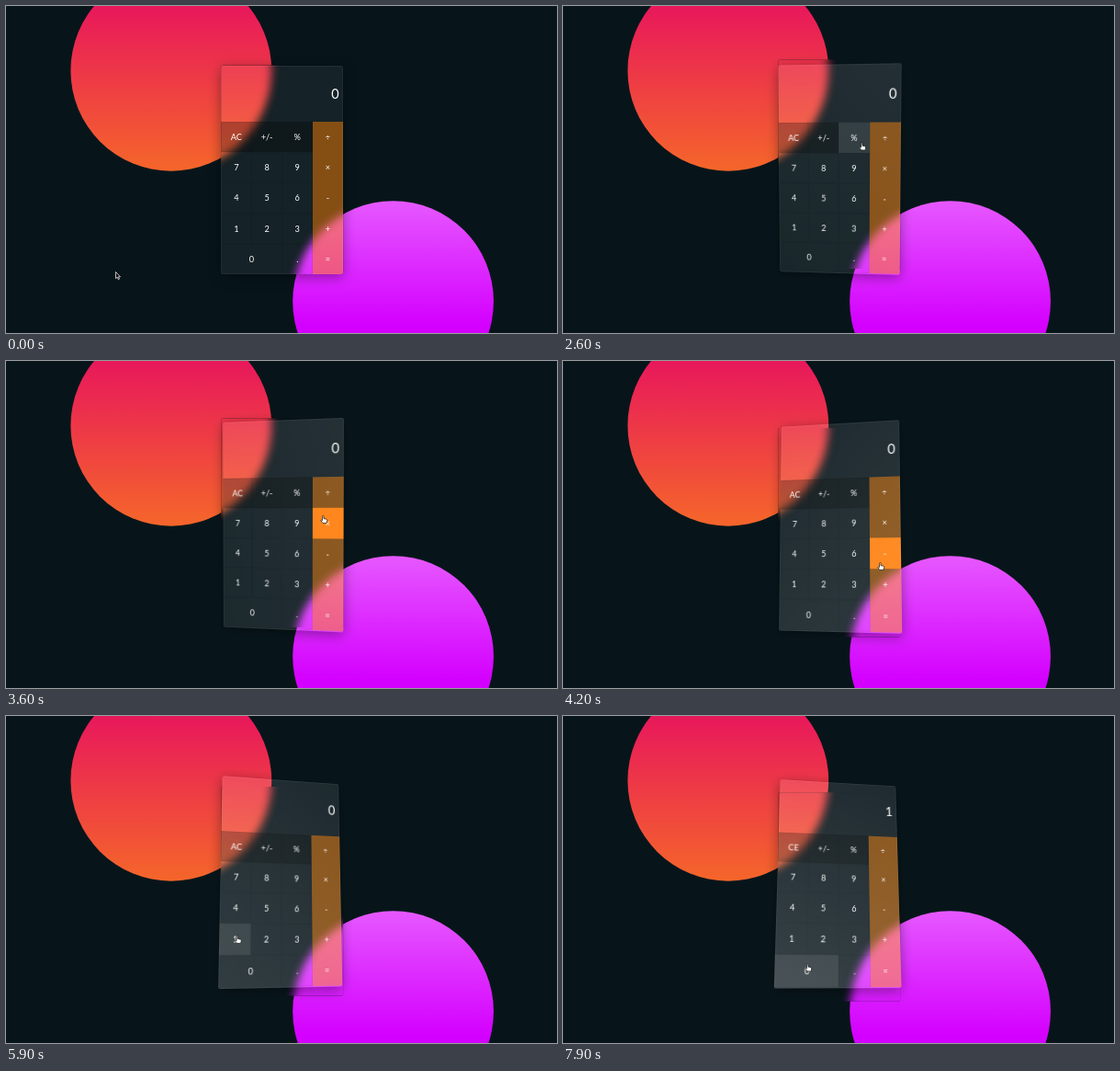
An HTML page that plays this animation: 600 by 356 pixels, repeating every 8 s.

```html
<!DOCTYPE html>
<html lang="en">
<head>
<meta charset="utf-8">
<title>Glass calculator</title>
<style>
  html, body { margin: 0; width: 100%; height: 100%; overflow: hidden; background: #07151a; }
  #stage { position: relative; width: 600px; height: 356px; overflow: hidden; }
  svg { position: absolute; left: 0; top: 0; }
  #calc {
    position: absolute; left: 234.3px; top: 64.5px; width: 132.8px; height: 227.5px;
    border-radius: 2.5px; background: rgba(255, 255, 255, .053);
    box-shadow: 0 3px 14px rgba(0, 0, 0, .38);
    color: #fff; font-family: Lato, "Open Sans", sans-serif;
  }
  #clip { position: absolute; inset: 0; overflow: hidden; border-radius: 2.5px; }
  #screen {
    position: absolute; right: 4.5px; top: 20.5px; height: 22px; line-height: 22px;
    font-size: 14.5px;
  }
  .key {
    position: absolute; box-sizing: border-box; height: 33.2px; line-height: 33px;
    text-align: center; font-size: 9.2px; box-shadow: inset 0 0 0 .5px rgba(0, 0, 0, .13);
  }
  .top { background: rgba(0, 0, 0, .28); }
  .op { background: rgba(255, 128, 0, .48); box-shadow: none; }
  .key.hover { background: rgba(255, 255, 255, .09); }
  .op.hover { background: #ff8010; }
  #glare {
    position: absolute; left: 50%; top: 50%; width: 456px; height: 456px; margin: -228px;
    background: linear-gradient(to top, rgba(255, 255, 255, 0), #fff);
  }
  #rim {
    position: absolute; inset: 0; border-radius: 2.5px;
    box-shadow: inset 0 0 0 .7px rgba(255, 255, 255, .08);
  }
</style>
</head>
<body>
<div id="stage">
  <svg width="600" height="356" viewBox="0 0 600 356">
    <defs>
      <linearGradient id="warm" x1="0" y1="0" x2="0" y2="1">
        <stop offset="0" stop-color="#e4095f"/>
        <stop offset=".18" stop-color="#e8185b"/>
        <stop offset="1" stop-color="#f5662a"/>
      </linearGradient>
      <linearGradient id="violet" x1="0" y1="0" x2="0" y2="1">
        <stop offset="0" stop-color="#e658ff"/>
        <stop offset=".62" stop-color="#d400ff"/>
        <stop offset="1" stop-color="#d000ff"/>
      </linearGradient>
      <filter id="blur" filterUnits="userSpaceOnUse" x="-60" y="-60" width="720" height="560"
              color-interpolation-filters="sRGB">
        <feGaussianBlur stdDeviation="5"/>
      </filter>
      <clipPath id="pane">
        <rect id="paneRect" x="234.3" y="64.5" width="132.8" height="227.5" rx="2.5"/>
      </clipPath>
      <g id="discs">
        <circle cx="179.8" cy="70.3" r="109.4" fill="url(#warm)"/>
        <circle cx="421.6" cy="321.6" r="109.4" fill="url(#violet)"/>
      </g>
    </defs>
    <use href="#discs"/>
    <g clip-path="url(#pane)">
      <rect width="600" height="356" fill="#07151a"/>
      <use href="#discs" filter="url(#blur)"/>
    </g>
  </svg>
  <div id="calc">
    <div id="clip">
      <div id="screen">0</div>
      <div id="keys"></div>
      <div id="glare"></div>
    </div>
    <div id="rim"></div>
  </div>
  <svg width="600" height="356" viewBox="0 0 600 356">
    <g id="cursor">
      <path id="arrow" d="M0 0V7.2L1.7 5.7L2.8 8.2L4 7.7L2.9 5.3H5Z"
            fill="#111" stroke="#fff" stroke-width=".7"/>
      <path id="hand" fill="#fff" stroke="#111" stroke-width=".7"
            d="M-.9 4V.3Q-.9-.5-.2-.5Q.5-.5.5.3V2.6L3.4 3.2Q4.3 3.5 4.2 4.5L3.7 7.4H-.6L-2.7 4.6Q-2.4 3.4-.9 4.6Z"/>
    </g>
  </svg>
</div>
<script>
  const LOOP = 8000, STEP = 100, ENTER = 1900, PRESS = 6000;
  const MAX_TILT = 15, MAX_GLARE = .2;
  const BOX = { x: 234.3, y: 64.5, w: 132.8, h: 227.5 };
  const CELL = 33.2, KEYS_TOP = 61.5;
  const $ = id => document.getElementById(id);
  const clamp = (v, lo = 0, hi = 1) => Math.min(hi, Math.max(lo, v));

  // time, x, y of the pointer's hot spot
  const path = [
    [0, 119.5, 289.5], [1200, 119.5, 289.5], [1900, 297.5, 290.5], [2200, 316, 215],
    [2600, 325.5, 149.5], [2850, 326, 148], [3200, 346, 144], [3600, 345.5, 169],
    [4000, 345.5, 203], [4400, 345.5, 237], [4900, 345, 278], [5500, 264, 260],
    [5850, 252, 240], [6150, 252, 240], [6900, 345.5, 246], [7250, 345.5, 246],
    [7900, 266.5, 270.5], [8000, 258, 271]
  ];

  const rows = [
    ['AC', '+/-', '%', '÷'], ['7', '8', '9', '×'], ['4', '5', '6', '-'],
    ['1', '2', '3', '+'], ['0', '', '.', '=']
  ];
  const keys = [];
  rows.forEach((row, r) => row.forEach((label, c) => {
    if (!label) return;
    const el = document.createElement('div');
    const key = { el, x: c * CELL, y: KEYS_TOP + r * CELL, w: label === '0' ? 2 * CELL : CELL };
    el.className = 'key' + (c === 3 ? ' op' : r === 0 ? ' top' : '');
    el.textContent = label;
    el.style.cssText = `left:${key.x}px;top:${key.y}px;width:${key.w}px`;
    $('keys').append(el);
    keys.push(key);
  }));

  function pointerAt(t) {
    const i = path.findIndex((p, n) => n && t <= p[0]);
    const [t0, x0, y0] = path[i - 1], [t1, x1, y1] = path[i];
    const u = (t - t0) / (t1 - t0), k = u * u * (3 - 2 * u);
    return [x0 + (x1 - x0) * k, y0 + (y1 - y0) * k];
  }

  function draw(t) {
    const [x, y] = pointerAt(t);
    const fx = clamp((x - BOX.x) / BOX.w), fy = clamp((y - BOX.y) / BOX.h);
    const amount = 1 - (1 - clamp((t - ENTER) / 350)) ** 3;
    const turnX = MAX_TILT * (2 * fy - 1) * amount;
    const turnY = MAX_TILT * (1 - 2 * fx) * amount;

    $('calc').style.transform = amount
      ? `perspective(480px) rotateX(${turnX}deg) rotateY(${turnY}deg)` : 'none';
    // the frosted pane slides instead of tilting with the body
    $('paneRect').setAttribute('y', BOX.y + 1.55 * turnX);

    const angle = Math.atan2((fx - .5) * BOX.w, (.5 - fy) * BOX.h);
    $('glare').style.transform = `rotate(${angle}rad)`;
    $('glare').style.opacity = fy * MAX_GLARE * amount;

    let over = false;
    for (const k of keys) {
      const dx = x - BOX.x - k.x, dy = y - BOX.y - k.y;
      const hit = t > ENTER && dx >= 0 && dx < k.w && dy >= 0 && dy < CELL;
      k.el.classList.toggle('hover', hit);
      over = over || hit;
    }
    $('screen').textContent = t >= PRESS ? '1' : '0';
    keys[0].el.textContent = t >= PRESS ? 'CE' : 'AC';
    $('cursor').setAttribute('transform', `translate(${x} ${y})`);
    $('arrow').style.display = over ? 'none' : '';
    $('hand').style.display = over ? '' : 'none';
  }

  const start = performance.now();
  function tick() {
    const t = (performance.now() - start) % LOOP;
    draw(Math.floor(t / STEP) * STEP);
    requestAnimationFrame(tick);
  }
  draw(0);
  requestAnimationFrame(tick);
</script>
</body>
</html>
```
